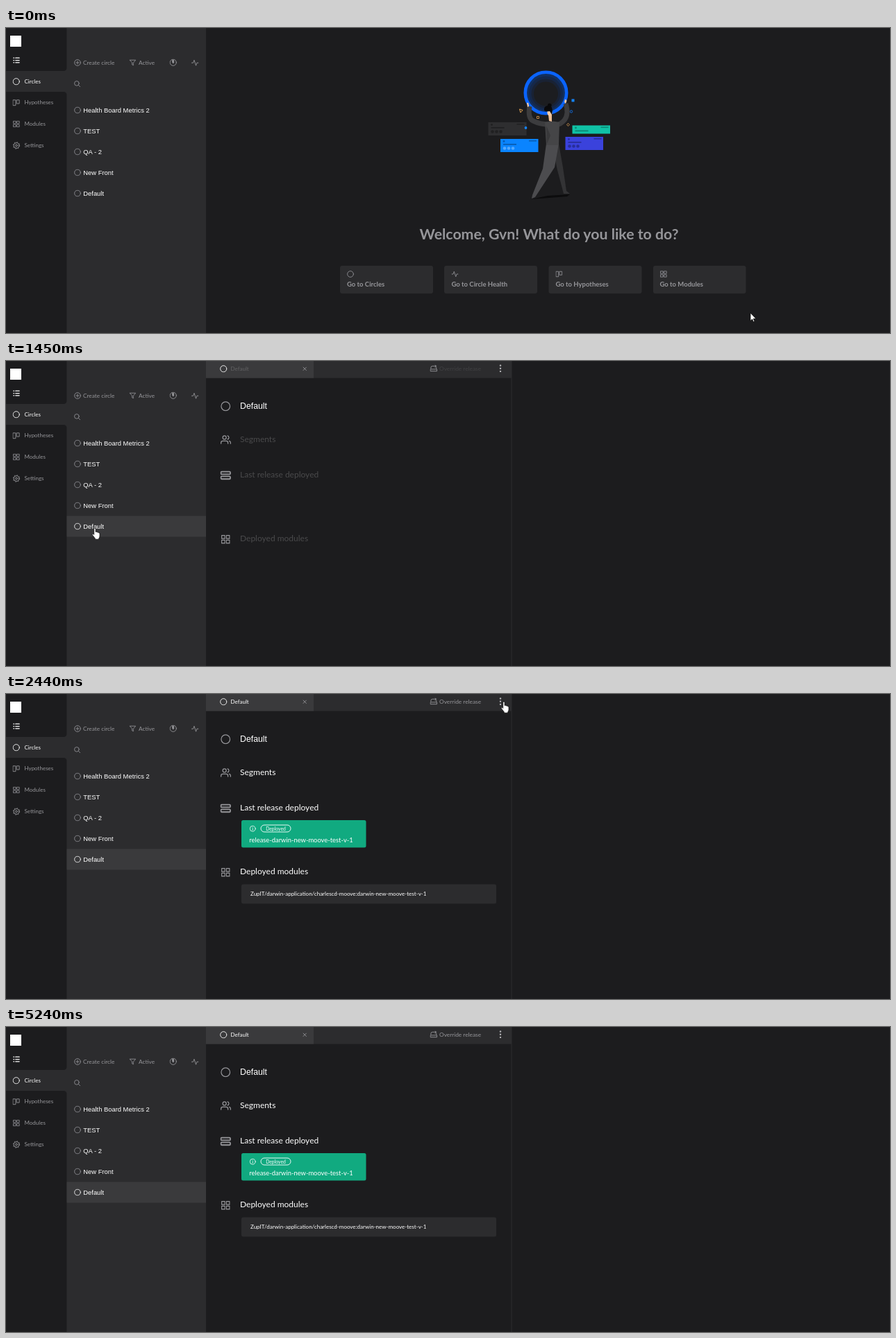
These frames come from a looping animation (1273x440 px, 5.79 s). An HTML page:

```html
<!DOCTYPE html>
<html lang="en">
<head>
<meta charset="utf-8">
<title>Circle workspace</title>
<style>
html, body { margin: 0; width: 100%; height: 100%; overflow: hidden; background: #1c1c1e; }
svg { display: block; }
#stage { width: 1273px; height: 440px; color: #96969a; font-family: Lato, sans-serif; font-size: 8px; }
text { fill: currentColor; }
use { fill: none; stroke: currentColor; stroke-width: 2; stroke-linecap: round; stroke-linejoin: round; }
.white { color: #fff; }
.arial { font-family: "Liberation Sans", Arial, sans-serif; }
.list { font-size: 9.4px; }
.top { font-size: 8.3px; }
.head { font-size: 12px; }
.go { font-size: 9.5px; font-weight: 700; }
.hello { font-size: 21.3px; font-weight: 700; text-anchor: middle; }
.bone { fill: #3a3a3c; }
.box { fill: #2c2c2e; }
.mark { fill: #000; fill-opacity: .3; stroke: none; }
.light { fill: #fff; }

/* One shared 5790 ms loop; percentages are ms / 57.9 */
.a { animation: 5790ms step-end infinite; }
.soft { animation-timing-function: linear; }
#cursor { animation-name: move; }
#arrow { animation-name: arrow; }
#hand { animation-name: hand; }
#welcome { animation-name: welcome; }
#row { animation-name: row; }
#ring { animation-name: ring; }
#panel { animation-name: slide; }
#bones { animation-name: bones; }
#content { animation-name: content; }
.title { animation-name: title; }
#card { animation-name: card; }
#strike { animation-name: strike; }
#module { animation-name: module; }
#path { animation-name: path; }
#menu { animation-name: menu; }
#pick { animation-name: pick; }

@keyframes move {
  0% { transform: translate(1072px, 411px); }
  1.2% { transform: translate(1040px, 405px); }
  2.46% { transform: translate(960px, 385px); }
  3.73% { transform: translate(830px, 352px); }
  4.99% { transform: translate(660px, 320px); }
  6.25% { transform: translate(470px, 290px); }
  7.49% { transform: translate(310px, 262px); }
  8.75% { transform: translate(190px, 243px); }
  10.01% { transform: translate(135px, 232px); }
  11.39% { transform: translate(132px, 236px); }
  12.69% { transform: translate(129px, 239px); }
  13.98% { transform: translate(128px, 241px); }
  29.01% { transform: translate(330px, 170px); }
  30.39% { transform: translate(500px, 105px); }
  31.43% { transform: translate(575px, 75px); }
  32.81% { transform: translate(620.5px, 60.5px); }
  34.19% { transform: translate(650px, 48px); }
  35.4% { transform: translate(680px, 36px); }
  36.78% { transform: translate(702px, 26px); }
  38.16% { transform: translate(716px, 18px); }
  39.55% { transform: translate(719px, 14px); }
  42.14% { transform: translate(717px, 11px); }
  43.52% { transform: translate(715px, 8px); }
  44.9% { transform: translate(713px, 8px); }
  46.28% { transform: translate(713px, 9px); }
  60.96% { transform: translate(708px, 20px); }
  62.34% { transform: translate(696px, 38px); }
  63.73% { transform: translate(682px, 56px); }
  65.11% { transform: translate(671px, 70px); }
  66.49% { transform: translate(664px, 80px); }
  67.87% { transform: translate(661px, 84px); }
  82.55% { transform: translate(680px, 100px); }
  83.93% { transform: translate(740px, 150px); }
  85.14% { transform: translate(830px, 215px); }
  86.52% { transform: translate(930px, 285px); }
  87.9% { transform: translate(1030px, 350px); }
  89.29% { transform: translate(1136px, 426px); }
  90.5%, 100% { transform: translate(1200px, 470px); }
}
@keyframes arrow {
  0%, 29.01%, 74.61%, 100% { opacity: 1; }
  11.39%, 42.14% { opacity: 0; }
}
@keyframes hand {
  0%, 29.01%, 74.61%, 100% { opacity: 0; }
  11.39%, 42.14% { opacity: 1; }
}
@keyframes welcome { 0% { opacity: 1; } 16.92%, 100% { opacity: 0; } }
@keyframes row { 0% { opacity: 0; } 10.01%, 100% { opacity: 1; } }
@keyframes ring { 0% { color: #96969a; } 18.13%, 100% { color: #fff; } }
@keyframes slide {
  0% { transform: translateX(-445px); }
  21.07% { transform: translateX(-111px); }
  22.45% { transform: translateX(-28px); }
  23.83%, 100% { transform: none; }
}
@keyframes bones { 0% { opacity: 1; } 25.04%, 100% { opacity: 0; } }
@keyframes content { 0% { opacity: 0; } 25.04%, 100% { opacity: 1; } }
@keyframes title { 0%, 25.04% { opacity: .2; } 27.63%, 29% { opacity: .56; } 31.43%, 100% { opacity: 1; } }
@keyframes card { 0%, 25.04% { opacity: 0; } 27.63%, 29% { opacity: .34; } 32.81%, 34.1% { opacity: .9; } 38.16%, 100% { opacity: 1; } }
@keyframes strike { 0% { opacity: .5; } 42.14%, 100% { opacity: 0; } }
@keyframes module { 0%, 29% { opacity: 0; } 32%, 100% { opacity: 1; } }
@keyframes path { 0%, 29% { opacity: 0; } 32.81%, 34.1% { opacity: .42; } 38.16%, 100% { opacity: 1; } }
@keyframes menu {
  0%, 74.61%, 100% { opacity: 0; }
  49.05%, 73.22% { opacity: .5; }
  50.43% { opacity: 1; }
}
@keyframes pick {
  0%, 74.61%, 100% { opacity: 0; transform: none; }
  62.34% { opacity: 1; transform: none; }
  63.73% { opacity: 1; transform: translateY(22.7px); }
  65.11% { opacity: 1; transform: translateY(45px); }
}
</style>
</head>
<body>
<svg id="stage" viewBox="0 0 1273 440">
<defs>
  <symbol id="circle" viewBox="0 0 24 24"><circle cx="12" cy="12" r="10.5"/></symbol>
  <symbol id="board" viewBox="0 0 24 24"><path d="M2 3h8v18H2zM14 3h8v12h-8z"/></symbol>
  <symbol id="grid" viewBox="0 0 24 24"><path d="M2 2h8v8H2zM14 2h8v8h-8zM2 14h8v8H2zM14 14h8v8h-8z"/></symbol>
  <symbol id="gear" viewBox="0 0 24 24"><circle cx="12" cy="12" r="3.2"/><circle cx="12" cy="12" r="8.5"/><circle cx="12" cy="12" r="10.5" stroke-dasharray="3.2 5.05" stroke-linecap="butt"/></symbol>
  <symbol id="plus" viewBox="0 0 24 24"><circle cx="12" cy="12" r="10.5"/><path d="M12 7v10M7 12h10"/></symbol>
  <symbol id="funnel" viewBox="0 0 24 24"><path d="M2 3h20l-8 9.500V21l-4-2v-6.500z"/></symbol>
  <symbol id="gauge" viewBox="0 0 24 24"><circle cx="12" cy="12" r="10.5"/><path d="M10 4h4v8l-2 3-2-3z" fill="currentColor"/></symbol>
  <symbol id="pulse" viewBox="0 0 24 24"><path d="M1 12h5l3-9 6 18 3-9h5"/></symbol>
  <symbol id="search" viewBox="0 0 24 24"><circle cx="10.5" cy="10.5" r="8"/><path d="M17 17l5 5"/></symbol>
  <symbol id="lines" viewBox="0 0 24 24"><path d="M9 4h13M9 12h13M9 20h13M2 4h2M2 12h2M2 20h2" stroke-width="3"/></symbol>
  <symbol id="users" viewBox="0 0 24 24"><path d="M17 21v-2a4 4 0 0 0-4-4H5a4 4 0 0 0-4 4v2M23 21v-2a4 4 0 0 0-3-3.900M16 3.100a4 4 0 0 1 0 7.800"/><circle cx="9" cy="7" r="4"/></symbol>
  <symbol id="server" viewBox="0 0 24 24"><g stroke-width="2.8"><rect x="1.5" y="4" width="21" height="6" rx="2"/><rect x="1.5" y="14.5" width="21" height="6" rx="2"/></g></symbol>
  <symbol id="info" viewBox="0 0 24 24"><circle cx="12" cy="12" r="10"/><path d="M12 11v6M12 7v.2"/></symbol>
  <symbol id="close" viewBox="0 0 24 24"><path d="M4 4l16 16M20 4L4 20" stroke-width="3.4"/></symbol>
  <symbol id="undo" viewBox="0 0 24 24"><circle cx="12" cy="12" r="10.5"/><path d="M8 8l8 8M16 8l-8 8"/></symbol>
  <symbol id="copy" viewBox="0 0 24 24"><rect x="9" y="9" width="13" height="13" rx="2"/><path d="M5 15H2V2h13v3"/></symbol>
  <symbol id="edit" viewBox="0 0 24 24"><path d="M11 4H3v18h17v-9M18 2l4 4-10 10-5 1 1-5z"/></symbol>
  <symbol id="trash" viewBox="0 0 24 24"><path d="M2 6h20M5 6v16h14V6M8 6V2h8v4M10 11v6M14 11v6"/></symbol>
  <symbol id="swap" viewBox="0 0 24 24"><path d="M3 12V9a5 5 0 0 1 5-5h11M16 1l4 3-4 4M2 14h20v6H2zM20 8v4"/></symbol>
  <g id="chip">
    <circle cx="5" cy="3.5" r="1.4"/><rect x="41" y="2" width="11" height="1.6"/><rect x="4" y="7" width="19" height="1.8"/>
  </g>
  <g id="pips"><circle cx="6" cy="13.5" r="2.3"/><circle cx="12" cy="13.5" r="2.3"/><circle cx="18" cy="13.5" r="2.3"/></g>
</defs>

<rect width="1273" height="440" fill="#1c1c1e"/>

<g id="welcome" class="a">
  <g transform="translate(694.5 136)"><rect width="55" height="19" fill="#2e2e30"/><use class="mark" href="#chip"/><use class="mark" href="#pips"/></g>
  <g transform="translate(712 160)"><rect width="54.5" height="19" fill="#0a84ff"/><use class="mark" href="#chip"/><use class="mark light" href="#pips"/></g>
  <g transform="translate(815.500 140.500)"><rect width="54.5" height="12" fill="#10c2a6"/><use class="mark" href="#chip"/></g>
  <g transform="translate(805.500 157)"><rect width="54.5" height="19" fill="#3a42dc"/><use class="mark" href="#chip"/><use class="mark" href="#pips"/></g>
  <g fill="none">
    <circle cx="777.5" cy="93.5" r="28" fill="#123060"/>
    <circle cx="777.5" cy="94" r="24.5" fill="#15284a"/>
    <circle cx="777.5" cy="94.5" r="21" fill="#192234"/>
    <circle cx="777.5" cy="95" r="17.5" fill="#1c1d20"/>
    <circle cx="777.5" cy="93.5" r="29.7" stroke="#0a64ff" stroke-width="4.6"/>
    <path d="M739.500 117l4.500 1.500-3 3.500z" stroke="#e0a050"/>
    <path d="M764.500 127.500h3v3h-3zM809.500 137.500l2 2-2 2-2-2z" stroke="#d5964c" stroke-width=".9"/>
    <circle cx="814" cy="120.5" r="1.7" stroke="#1468d0"/>
    <circle cx="748.5" cy="144" r="1.9" fill="#1585ff"/>
    <path d="M814.500 102.500h4v4h-4z" fill="#1585ff"/>
  </g>
  <path d="M756 247l24-5 32-2-4 3z" fill="#0c0c0d"/>
  <path d="M786 167h10l6 34 5 34 5 4h-9l-9-34z" fill="#333335"/>
  <path d="M778 167h18l-6 34-28 43-5 2 1-5 15-38z" fill="#4c4c4f"/>
  <path d="M754 113q-3 17 5 21 10 5 22 5M806 109q5 15-2 24-5 6-12 7" fill="none" stroke="#3c3c3e" stroke-width="7"/>
  <path d="M776 136q10-3 21 0l-1 33h-18z" fill="#454547"/>
  <path d="M778 141l6 14-5 12z" fill="#39393b"/>
  <path d="M781 125l5-1v11l-4-1z" fill="#efbf96"/>
  <ellipse cx="783" cy="122" rx="3.6" ry="4.6" fill="#f5cba4"/>
  <path d="M775 119q-1-6 5-7 0-4 4-3 3 2 1 4 3 4 1 12l-3-5q-5 1-8-1z" fill="#09090a"/>
  <path d="M750 108q2-1 2.500 1l.5 4-2 1zM805 103q2 0 2.500 2l-1.500 4-2-2z" fill="#f5cba4"/>
  <text class="hello" x="782" y="304.7">Welcome, Gvn! What do you like to do?</text>
  <g class="box">
    <rect x="481" y="343" width="134" height="40" rx="3"/><rect x="631" y="343" width="134" height="40" rx="3"/>
    <rect x="781.5" y="343" width="134" height="40" rx="3"/><rect x="932" y="343" width="133.5" height="40" rx="3"/>
  </g>
  <use href="#circle" x="491" y="350" width="10" height="10"/><use href="#pulse" x="641.5" y="350" width="10" height="10"/>
  <use href="#board" x="791.5" y="350" width="10" height="10"/><use href="#grid" x="942" y="350" width="10" height="10"/>
  <g class="go">
    <text x="491" y="373.3">Go to Circles</text><text x="641.5" y="373.3">Go to Circle Health</text>
    <text x="791.5" y="373.3">Go to Hypotheses</text><text x="941.5" y="373.3">Go to Modules</text>
  </g>
</g>

<g id="panel" class="a">
  <rect x="288" width="440" height="440" fill="#1c1c1e"/>
  <rect x="727.5" width="1" height="440" class="box"/>
  <rect x="288" width="440" height="24.5" class="box"/>
  <rect x="288" width="155" height="24.5" class="bone"/>
  <g id="bones" class="a bone">
    <rect x="333" y="55" width="200" height="14.5" rx="2"/><rect x="333" y="98" width="200" height="14.5" rx="2"/>
    <path d="M333 132h53v14h-53zm66.500 0h53v14h-53zm66.500 0h53v14h-53zM333 158.500h53v14h-53zm66.500 0h53v14h-53zm66.500 0h53v14h-53zM333 185h53v14h-53zm66.500 0h53v14h-53zm66.500 0h53v14h-53z"/>
    <rect x="333" y="219" width="200" height="14" rx="2"/><rect x="333" y="252" width="179" height="40" rx="2"/>
    <rect x="333" y="315.5" width="200" height="14.5" rx="2"/>
  </g>
  <g id="content" class="a">
    <use class="white" href="#circle" x="308" y="6" width="10.5" height="10.5"/>
    <text class="a soft title white" x="323.5" y="14">Default</text>
    <use href="#close" x="427" y="8" width="6.5" height="6.5"/>
    <use href="#swap" x="610.5" y="5.5" width="11" height="11"/>
    <text class="a soft title top" x="624" y="14">Override release</text>
    <g fill="#b0b0b3"><circle cx="712" cy="6.5" r="1.2"/><circle cx="712" cy="10.7" r="1.2"/><circle cx="712" cy="14.9" r="1.2"/></g>
    <use href="#circle" x="309" y="58" width="14.5" height="14.5"/>
    <use href="#users" x="309" y="106" width="15" height="15"/>
    <use href="#server" x="308.5" y="157" width="15.5" height="15.5"/>
    <use href="#grid" x="309.5" y="250.5" width="13.5" height="13.5"/>
    <text class="white arial" font-size="12.3" x="337" y="69.3">Default</text>
    <g class="a soft title white head">
      <text x="337" y="117">Segments</text><text x="337" y="168">Last release deployed</text>
      <text x="337" y="260.3">Deployed modules</text>
    </g>
    <g id="card" class="a soft white">
      <rect x="339" y="182" width="179.5" height="39.5" rx="2.5" fill="#11aa80"/>
      <use href="#info" x="350.5" y="189.5" width="9.5" height="9.5"/>
      <rect x="367" y="189" width="43" height="10" rx="5" fill="none" stroke="#fff" stroke-width=".9"/>
      <text x="388.5" y="196.6" font-size="6.8" text-anchor="middle">Deployed</text>
      <text x="350.3" y="213.7" font-size="9.4">release-darwin-new-moove-test-v-1</text>
      <rect id="strike" class="a" x="350" y="210.5" width="149" height="1" fill="#fff"/>
    </g>
    <rect id="module" class="a soft box" x="339" y="274.5" width="367" height="28" rx="2.5"/>
    <text id="path" class="a soft white" x="352" y="291">ZupIT/darwin-application/charlescd-moove:darwin-new-moove-test-v-1</text>
    <g id="menu" class="a arial">
      <rect x="620.5" y="24" width="91.5" height="112" rx="2" class="box"/>
      <rect id="pick" class="a bone" x="620.5" y="23.5" width="91.5" height="22.5"/>
      <use href="#edit" x="625" y="29.5" width="9.5" height="9.5"/><text x="638" y="37">Edit segments</text>
      <use href="#undo" x="625" y="52.2" width="9.5" height="9.5"/><text x="638" y="59.7">Undeploy</text>
      <use href="#copy" x="625" y="75" width="9.5" height="9.5"/><text x="638" y="82.3">Copy ID</text>
      <use href="#copy" x="625" y="97.7" width="9.5" height="9.5"/><text x="638" y="105">Copy link</text>
      <use href="#trash" x="625" y="120.4" width="9.5" height="9.5"/><text x="638" y="127.7">Delete</text>
    </g>
  </g>
</g>

<g id="sidebar">
  <rect width="288" height="440" fill="#2c2c2e"/>
  <path d="M0 0h87.500v57q0 5-5 5H0zM0 92h82.500q5 0 5 5v343H0z" fill="#1c1c1e"/>
  <rect x="6" y="11" width="16" height="16" fill="#fff"/>
  <use class="white" href="#lines" x="10" y="41.5" width="10" height="10"/>
  <use class="white" href="#circle" x="9.5" y="72" width="10.5" height="10.5"/>
  <use href="#board" x="9.5" y="102.5" width="10.5" height="10.5"/>
  <use href="#grid" x="10" y="133.5" width="10" height="10"/>
  <use href="#gear" x="9.5" y="164" width="11" height="11"/>
  <text class="white" x="26.5" y="79.7">Circles</text><text x="26.5" y="110.3">Hypotheses</text>
  <text x="26.5" y="141">Modules</text><text x="26.5" y="171.7">Settings</text>

  <use href="#plus" x="98" y="45" width="10" height="10"/><use href="#funnel" x="177.5" y="45" width="10" height="10"/>
  <use href="#gauge" x="235.5" y="44.5" width="10.5" height="10.5"/><use href="#pulse" x="267" y="45" width="10.5" height="10.5"/>
  <use href="#search" x="97.5" y="75.5" width="10" height="10"/>
  <g class="top"><text x="111" y="52.7">Create circle</text><text x="191" y="52.7">Active</text></g>

  <rect id="row" class="a bone" x="87.5" y="223.5" width="200.5" height="30"/>
  <use href="#circle" x="98" y="113.5" width="10" height="10"/><use href="#circle" x="98" y="143.5" width="10" height="10"/>
  <use href="#circle" x="98" y="173.5" width="10" height="10"/><use href="#circle" x="98" y="203.5" width="10" height="10"/>
  <use id="ring" class="a" href="#circle" x="98" y="233.5" width="10" height="10"/>
  <g class="list arial white">
    <text x="111.3" y="122.2">Health Board Metrics 2</text><text x="111.3" y="152.2">TEST</text>
    <text x="111.3" y="182.2">QA - 2</text><text x="111.3" y="212.2">New Front</text>
    <text x="111.3" y="242.2">Default</text>
  </g>
</g>

<g id="cursor" class="a" fill="#fff" stroke="#000" stroke-width=".7" stroke-linejoin="round">
  <path id="arrow" class="a" d="M0 0v11.500l2.600-2.400 1.700 3.900 1.700-.8-1.700-3.800H8z"/>
  <path id="hand" class="a" d="M-1.300 1.200q0-1.200 1.200-1.200t1.200 1.200V5.500q1.700-.6 2.200.5 1.500-.4 1.900.7 1.800-.3 1.800 1.400v3.400q0 2-1.300 3.400v1.300H.3v-1.300l-3.900-5q-.6-1.400.7-1.800l1.600 1.400z"/>
</g>
</svg>
</body>
</html>
```
